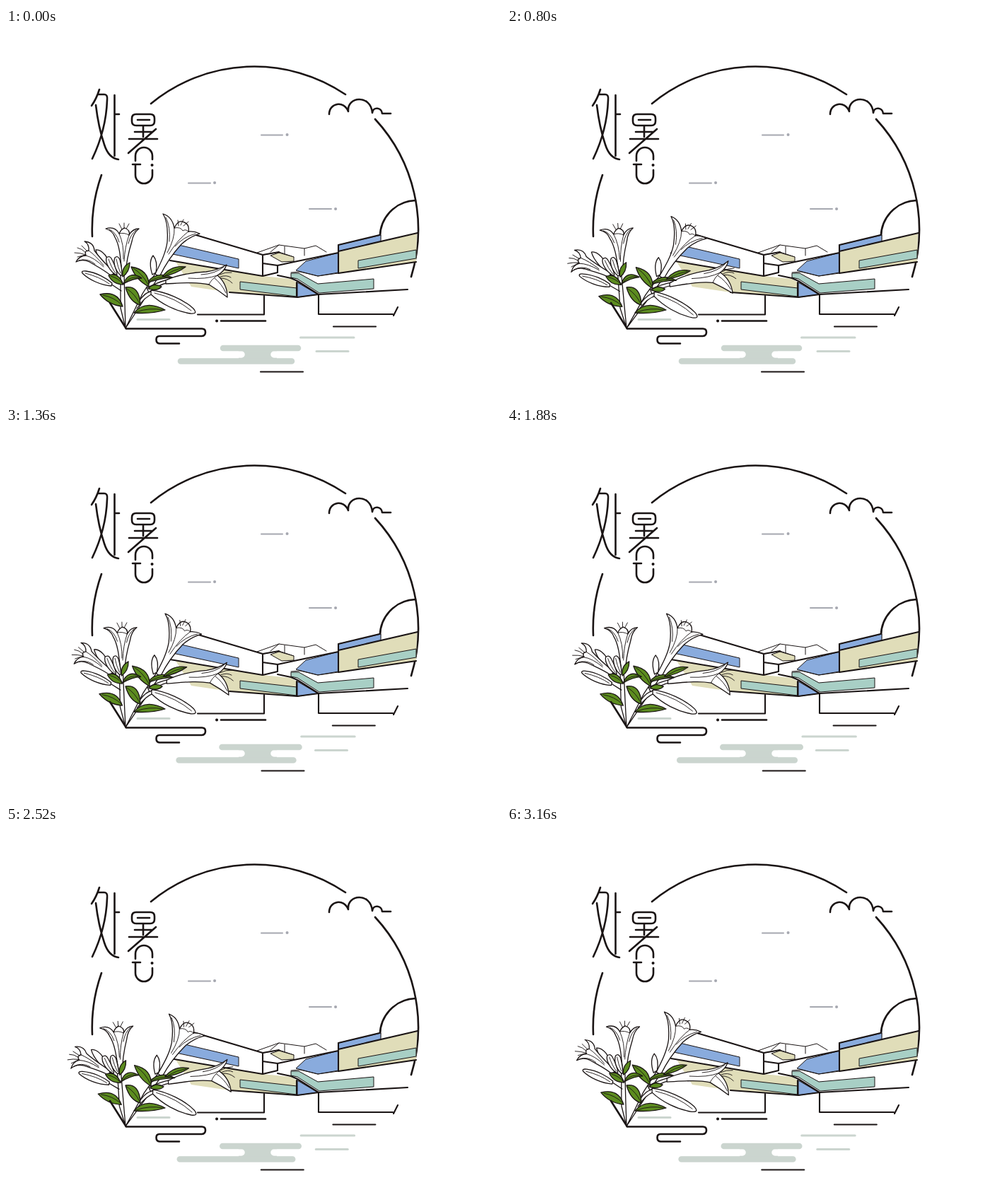
Animation, 700 px wide and 525 px high, one loop 3.2 s. Source, as an HTML page:

```html
<!DOCTYPE html>
<html lang="zh">
<head>
<meta charset="utf-8">
<title>处暑</title>
<style>
html, body { margin: 0; width: 100%; height: 100%; overflow: hidden; background: #fff; }
svg { display: block; width: 700px; height: 525px; }
path { stroke-linejoin: round; }
.ink { fill: none; stroke: #1a1414; stroke-width: 2.6; stroke-linecap: round; }
.mid { stroke-width: 2.1; }
.thin { stroke-width: 1; }
.blue { fill: #89abdd; }
.cream { fill: #e0ddb9; }
.teal { fill: #a8cfc5; }
.edge { stroke: #1a1414; stroke-width: 1; }
.sky { fill: none; stroke: #a6a8b0; stroke-width: 2; stroke-linecap: round; }
.dot { stroke-width: 4; }
.water { fill: none; stroke: #cbd5cf; stroke-width: 3; stroke-linecap: round; }
.plant path { fill: #fff; stroke: #1a1414; stroke-width: 1.3; stroke-linecap: round; }
.plant .leaf { fill: #5c8c1f; }
.plant .vein { fill: none; stroke-width: .9; }
</style>
</head>
<body>
<svg viewBox="0 0 700 525" role="img" aria-label="处暑">
  <!-- ring, cloud, sun -->
  <path class="ink" d="M205 107A230 230 0 0 1 480 94M522 129A230 230 0 0 1 573 352M135 208A230 230 0 0 0 122 295"/>
  <path class="ink" d="M457 122C457 106 478 102 484 118C482 96 516 94 518 120C519 111 531 112 532 121H544"/>
  <path class="ink" d="M529 299A52 52 0 0 1 579 244"/>
  <path class="sky" d="M361 151.500H391M258 219.500H289M429 256H460"/>
  <path class="sky dot" d="M397.500 151h.1M295 219h.1M466 256h.1"/>

  <!-- lettering -->
  <path class="ink" d="M132 87Q128 100 121 110M130 94H139Q144 94 143 102C142 132 133 162 122 185M127 109C130 135 134 150 139 165Q145 184 159 186M153.500 95V181M154 122H160"/>
  <path class="ink" d="M184 122H204Q210 122 210 128V132Q210 138 204 138H184Q178 138 178 132V128Q178 122 184 122M186 130H203M194 139V154M182 147H206M174 157H214M212 143L173 177M183 188V181A12 12 0 0 1 207 181V186M179 193H190M183 193V208A12 12 0 0 0 207 208V201"/>
  <path class="ink dot" d="M206.500 194h.1M298 414.500h.1"/>

  <!-- buildings -->
  <path class="ink thin" d="M355 318L386 307L422 312L438 308L453 317M394 309V319M422 312V322M386 307L374 317M364 321L386 317L407 324"/>
  <path class="cream edge" d="M374 322L386 318L407 324V330L390 331Z"/>
  <path class="blue edge" d="M424 330L470 318V346L441 351L410 343Z"/>
  <path class="cream" d="M240 331L363 351L403 355L411 360V381L316 374L262 366Z"/>
  <path class="blue edge" d="M240 306L329 327V340L231 319Z"/>
  <path class="teal edge" d="M331 359L411 368V380L331 370Z"/>
  <path class="blue edge" d="M412 360L441 377L412 381Z"/>
  <path class="teal edge" d="M403 347L414 347L441 362L520 355V369L443 375L412 355L403 353Z"/>
  <path class="blue edge" d="M470 307L530 293V302L470 316Z"/>
  <path class="cream" d="M470 317L581 291L580 331L470 347Z"/>
  <path class="teal edge" d="M498 329L580 314V326L498 340Z"/>
  <path class="ink thin" d="M403 346L416 345L441 351L470 347"/>
  <path class="ink mid" d="M262 291L363 321V350M363 321L386 317M232 329L363 351L384 346V336L363 333M384 336L412 330L470 318M384 350L403 354L412 358L442 377M411 360V381M470 307L528 293M470 347V307M470 316L582 290M470 347L580 331M316 374L412 381L442 377L568 370"/>
  <path class="ink mid" d="M365 379V405.500H271M442 377V405H547M548 407L554 395"/>

  <!-- water -->
  <path class="water" d="M186 412.500H231"/>
  <path class="water" id="w0" d="M416.500 438H492"/>
  <path class="water" id="w1" d="M439 457.500H484"/>
  <path class="ink mid" id="w2" d="M463 422.500H523"/>
  <path class="ink mid" id="w3" d="M360 486.500H420"/>
  <g stroke-linecap="round" fill="none">
    <path d="M329 462H383" stroke="#cbd5cf" stroke-width="20" stroke-linecap="butt"/>
    <path d="M290 462H333M379 462H420" stroke="#fff" stroke-width="9.500"/>
    <path id="bar0" stroke="#cbd5cf" stroke-width="8.500"/>
    <path id="bar1" stroke="#cbd5cf" stroke-width="8.500"/>
  </g>
  <path class="ink" d="M304 414.500H367"/>

  <!-- lilies -->
  <g class="plant" id="right">
    <path d="M169 425L193 376L212 346L217 350L200 377Z"/>
    <path d="M187 388Q197 373 207 372L208 376Q196 380 185 397"/>
    <path d="M205 371C225 373 251 384 265 397Q272 405 261 404C240 401 219 390 205 377Z"/>
    <path class="vein" d="M210 375Q240 382 262 400"/>
    <path d="M207 349Q201 331 208 322Q215 330 212 346Z"/>
    <path d="M211 348C219 332 226 318 228 303C229 289 229 274 222 263Q235 267 238 283Q243 272 250 274Q260 277 258 288Q266 287 274 291Q260 295 248 306C237 318 226 333 217 352Z"/>
    <path class="vein" d="M238 283Q239 298 228 318M258 288Q244 298 230 320M226 268Q233 282 231 302M268 291Q250 296 239 309M238 283Q247 281 250 287Q254 284 258 288M244 280L243 272M247 279L251 271M251 280L258 274"/>
    <path d="M199 368Q214 360 229 356L230 360Q214 364 202 374Z"/>
    <g id="lowFlower">
      <path d="M226 357C245 348 265 346 283 345Q299 343 312 335Q309 344 299 350Q313 362 313 381Q300 371 287 363C268 359 248 361 226 362Z"/>
      <path class="vein" d="M299 350Q283 356 258 354M287 363Q290 356 299 350M308 338Q296 348 276 349M311 375Q305 362 295 354M302 349Q310 345 319 346M303 352Q312 349 318 353M304 354Q313 354 320 361"/>
    </g>
    <path class="leaf" d="M199 361Q212 343 235 353Q217 354 199 361Z"/>
    <path class="leaf" d="M221 352Q233 335 254 338Q241 348 221 352Z"/>
    <path class="leaf" d="M202 366Q203 342 177 338Q184 357 202 366Z"/>
    <path class="leaf" d="M201 369Q208 360 220 366Q214 373 201 369Z"/>
    <path class="vein" d="M202 359Q216 350 231 353M225 350Q237 342 250 339M180 340Q193 348 201 363"/>
  </g>
  <g class="plant" id="left">
    <path d="M169 425L162 396L162 345H167L168 390Z"/>
    <path d="M148 362L163 372M149 349L163 358"/>
    <path d="M149 365C134 364 117 356 108 347Q106 343 113 344C128 346 142 354 150 361Z"/>
    <path class="vein" d="M112 347Q132 352 146 362"/>
    <path d="M164 348C162 326 161 308 154 296Q151 287 141 284Q154 280 160 291Q163 284 168 283Q176 286 174 293Q179 284 188 284Q180 290 178 302C173 318 170 332 169 348Z"/>
    <path class="vein" d="M160 291Q167 306 166 327M174 293Q168 310 167 330M146 285Q156 289 160 303M184 286Q176 292 173 305M160 291Q167 289 174 293M164 285L160 277M167 283L167 276M170 284L174 277"/>
    <path d="M153 349C142 343 129 325 127 314Q133 313 140 321C148 332 153 340 156 349Z"/>
    <g id="sideFlower">
      <path d="M149 351C140 343 128 337 118 331Q108 326 99 331Q104 322 113 322Q110 315 117 315Q118 306 111 302Q124 303 125 315C133 326 143 336 153 346Z"/>
      <path class="vein" d="M113 322Q125 325 138 338M117 315Q127 322 138 336M103 329Q115 325 126 334M113 321Q105 318 97 318M113 318Q107 312 101 311M115 316L107 308M113 321L101 324"/>
    </g>
    <path d="M155 349C147 344 140 332 142 325Q147 321 150 328C154 336 157 342 157 349Z"/>
    <path d="M162 350C155 344 151 332 154 325Q158 321 161 328C163 336 164 343 164 350Z"/>
    <path class="vein" d="M145 327Q149 339 155 347M156 327Q158 338 162 347"/>
    <path class="leaf" d="M166 363Q159 345 145 350Q151 363 166 363Z"/>
    <path class="leaf" d="M166 362Q174 342 192 354Q180 354 166 362Z"/>
    <path class="leaf" d="M165 352Q163 338 175 332Q175 345 165 352Z"/>
    <path class="leaf" d="M165 394Q158 371 133 377Q145 392 165 394Z"/>
    <path class="vein" d="M137 378Q153 381 164 392M148 351Q159 354 165 362M168 360Q177 351 188 353"/>
  </g>
  <g class="plant">
    <path class="leaf" d="M169 367Q189 364 190 392Q175 388 169 367Z"/>
    <path class="leaf" d="M181 403Q197 384 225 399Q205 405 181 403Z"/>
    <path class="vein" d="M171 369Q183 377 189 390M184 402Q203 395 222 399"/>
  </g>

  <path class="ink" d="M147 389L170 425.500H277Q282 425.500 282 430.500T277 436H217Q212.500 436 212.500 441T217 446.500H245"/>
</svg>
<script>
const $ = id => document.getElementById(id);
// Triangle wave: 0 -> 1 -> 0 over one period
const wave = (t, period) => 1 - Math.abs(1 - 2 * (t % period) / period);
const turn = (id, deg, x, y) => $(id).setAttribute('transform', `rotate(${deg} ${x} ${y})`);
const bar = (id, center, half, y) => $(id).setAttribute('d', `M${center - half} ${y}H${center + half}`);
const drift = [2, -2.5, -2, 2.5];

function draw(now) {
  const t = Math.floor(now % 3200 / 40) * 40;
  const sway = wave(t, 1600), ripple = wave(t, 800);
  turn('right', 3.6 * sway, 168, 424);
  turn('lowFlower', -10 * sway, 228, 358);
  turn('left', -4 * sway, 168, 424);
  turn('sideFlower', -10 * sway, 150, 350);
  drift.forEach((d, i) => $('w' + i).setAttribute('transform', `translate(${d * ripple})`));
  bar('bar0', 360, 53 + 2.5 * ripple, 453);
  bar('bar1', 325.5, 78.5 + 4 * ripple, 471.5);
}

const start = performance.now();
(function loop() {
  draw(performance.now() - start);
  requestAnimationFrame(loop);
})();
</script>
</body>
</html>
```
